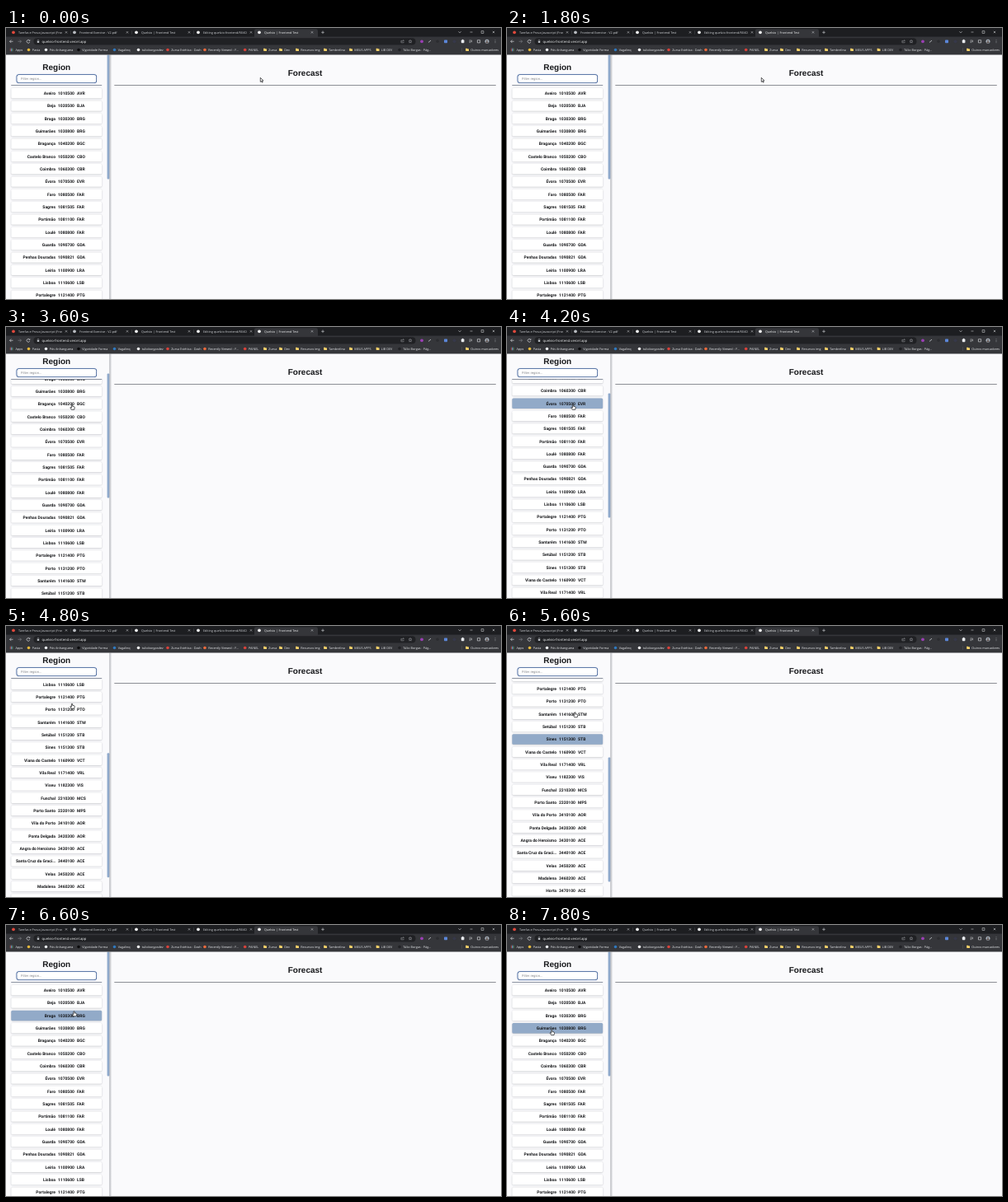
Write an HTML page with a canvas that moves like this. It is 600x329 px and loops after 8000 ms.

```html
<!DOCTYPE html>
<html lang="pt">
<head>
<meta charset="utf-8">
<title>Forecast</title>
<style>
html, body { margin: 0; width: 100%; height: 100%; overflow: hidden; background: #fafafc; }
canvas { display: block; width: 600px; height: 329px; }
</style>
</head>
<body>
<canvas id="stage"></canvas>
<script>
const W = 600, H = 329, LOOP = 8000;
const canvas = document.getElementById('stage');
const ctx = canvas.getContext('2d');
const dpr = window.devicePixelRatio || 1;
canvas.width = W * dpr;
canvas.height = H * dpr;

const UI = '"Open Sans", sans-serif';
const PAGE = 'Roboto, sans-serif';
const ARIAL = '"Liberation Sans", Arial, sans-serif';

const PITCH = 15.33, FIRST = 79.3, ROW_H = 12.4;
const VIEW_TOP = 32.5, THUMB_H = 151, MAX_SCROLL = 284;

const regions = `Aveiro 1010500 AVR|Beja 1020500 BJA|Braga 1030300 BRG|Guimarães 1030800 BRG
Bragança 1040200 BGC|Castelo Branco 1050200 CBO|Coimbra 1060300 CBR|Évora 1070500 EVR
Faro 1080500 FAR|Sagres 1081505 FAR|Portimão 1081100 FAR|Loulé 1080800 FAR
Guarda 1090700 GDA|Penhas Douradas 1090821 GDA|Leiria 1100900 LRA|Lisboa 1110600 LSB
Portalegre 1121400 PTG|Porto 1131200 PTO|Santarém 1141600 STM|Setúbal 1151200 STB
Sines 1151300 STB|Viana do Castelo 1160900 VCT|Vila Real 1171400 VRL|Viseu 1182300 VIS
Funchal 2310300 MCS|Porto Santo 2320100 MPS|Vila do Porto 3410100 AOR|Ponta Delgada 3420300 AOR
Angra do Heroísmo 3430100 ACE|Santa Cruz da Graci… 3440100 ACE|Velas 3450200 ACE|Madalena 3460200 ACE
Horta 3470100 ACE|Santa Cruz das Flor… 3480200 AOC|Vila do Corvo 3490100 AOC`
  .split(/[|\n]/).map(s => s.match(/^(.*) (\d+) (\w+)$/).slice(1));

// [time, scroll]
const scrollKeys = [[3350, 0], [3850, 93.9], [4320, 93.9], [4800, 238.3], [5120, MAX_SCROLL],
  [5500, MAX_SCROLL], [6000, 107.6], [6550, 0]];
// [time, x, y] of the pointer tip
const pointerKeys = [[2050, 308.3, 60.3], [2400, 150, 96], [2800, 82, 80], [3100, 75.5, 87.6], [3240, 75.5, 87.6],
  [3400, 80, 94], [5000, 80, 94], [5180, 82.5, 104.5], [6650, 82.5, 104.5], [7080, 72, 154],
  [7380, 67.5, 127.3], [7620, 67.5, 127.3], [7790, 54.3, 127.3]];
// [from, to, row] while the pointer rests on a row
const hovers = [[2750, 3210, 0], [3290, 3500, 1], [3820, 4370, 7], [5130, 5720, 20], [5800, 5850, 13],
  [6300, 6740, 2], [6740, 6870, 3], [6870, 7000, 4], [7000, 7180, 5], [7180, 7290, 4], [7290, 9000, 3]];
const FADE = 250;

function at(keys, t, col) {
  if (t <= keys[0][0]) return keys[0][col];
  for (let i = 1; i < keys.length; i++) {
    const a = keys[i - 1], b = keys[i];
    if (t < b[0]) return a[col] + (b[col] - a[col]) * (t - a[0]) / (b[0] - a[0]);
  }
  return keys[keys.length - 1][col];
}

function glow(row, t) {
  let sum = 0;
  for (const [from, to, r] of hovers) {
    if (r === row) sum += Math.max(0, Math.min(t, to) - Math.max(t - FADE, from));
  }
  return Math.min(1, sum / FADE);
}

function text(str, x, y, size, color, family = UI, weight = 400, align = 'left') {
  ctx.font = `${weight} ${size}px ${family}`;
  ctx.fillStyle = color;
  ctx.textAlign = align;
  ctx.textBaseline = 'alphabetic';
  ctx.fillText(str, x, y);
}

function rect(x, y, w, h, color) {
  ctx.fillStyle = color;
  ctx.fillRect(x, y, w, h);
}

function pill(x, y, w, h, r, color) {
  ctx.beginPath();
  ctx.roundRect(x, y, w, h, r);
  ctx.fillStyle = color;
  ctx.fill();
}

function dot(x, y, r, color) {
  ctx.beginPath();
  ctx.arc(x, y, r, 0, 7);
  ctx.fillStyle = color;
  ctx.fill();
}

function stroke(d, x, y, color, width = 0.6) {
  ctx.save();
  ctx.translate(x, y);
  ctx.strokeStyle = color;
  ctx.lineWidth = width;
  ctx.stroke(new Path2D(d));
  ctx.restore();
}

const CROSS = 'M-1.2-1.2L1.2 1.2M1.2-1.2L-1.2 1.2';

function drawTabs() {
  rect(0, 0, W, 11, '#1d1e21');
  pill(301, 1.2, 77, 12, 2.2, '#35363a');
  const tabs = [
    [9, '#e0493c', 'Tarefas e Prova Javascript (Fronte'],
    [83, '#b9bcc1', 'Frontend Exercise - V2.pdf'],
    [158, '#f2f2f2', 'Quelvio | Frontend Test'],
    [233, '#f2f2f2', 'Editing quelvio-frontend/READM'],
    [307, '#f2f2f2', 'Quelvio | Frontend Test']
  ];
  tabs.forEach(([x, color, label], i) => {
    dot(x, 5.3, 1.9, color);
    ctx.save();
    ctx.beginPath();
    ctx.rect(x + 5, 0, 54, 11);
    ctx.clip();
    text(label, x + 6, 6.6, 3.75, i === 4 ? '#f1f3f4' : '#d0d3d7');
    ctx.restore();
    stroke(CROSS, x + 64, 5.3, '#d0d3d7', 0.5);
    if (i < 3) rect(x + 69, 3.2, 0.4, 4.5, '#55575c');
  });
  stroke('M-1.8 0H1.8M0-1.8V1.8', 384, 5.3, '#d0d3d7');
  stroke('M-1.5-.7L0 .8L1.5-.7', 550, 5, '#e8eaed');
  stroke('M-1.5 0H1.5', 564, 5, '#e8eaed', 0.5);
  stroke('M-1.4-1.4H1.4V1.4H-1.4Z', 577.5, 5, '#e8eaed', 0.5);
  stroke(CROSS, 591, 5, '#e8eaed', 0.5);
}

function drawToolbar() {
  rect(0, 10.6, W, 21.9, '#35363a');
  stroke('M2 0H-2M-.2-1.8L-2 0L-.2 1.8', 6.5, 16.3, '#e8eaed');
  stroke('M-2 0H2M.2-1.8L2 0L.2 1.8', 16.5, 16.3, '#85888d');
  stroke('M1.6-1A1.9 1.9 0 1 0 1.8.7M1.9-2V-.7H.6', 27, 16.3, '#e8eaed');
  pill(33.5, 12.2, 463, 8.3, 4.1, '#202124');
  rect(37.8, 15.9, 2.4, 2, '#c4c7cc');
  stroke('M-.8 0V-1A.8.8 0 0 1 .8-1V0', 39, 16, '#c4c7cc', 0.4);
  text('quelvio-frontend.vercel.app', 43.5, 17.8, 4.2, '#f1f3f4');
  stroke('M-.6-.8H-1.6V1.6H1.6V.6M-.6.5Q-.4-1 1.7-1M.9-1.9L1.8-1L.9-.1', 480.5, 16.2, '#c4c7cc', 0.4);
  stroke('M0-1.9L.6-.6L1.9-.5L.9.4L1.2 1.8L0 1L-1.2 1.8L-.9.4L-1.9-.5L-.6-.6Z', 490, 16.3, '#c4c7cc', 0.4);
  dot(504, 16.3, 1.9, '#9b3fb5');
  stroke('M-1.5 1.2L1.5-1.2', 513.5, 16.3, '#b5b8bd', 0.9);
  dot(523, 16.3, 1.8, '#2b2c30');
  pill(531, 14.4, 4, 3.9, 0.7, '#5b86d8');
  dot(543.5, 16.3, 1.9, '#36384a');
  pill(551.8, 14.6, 3.6, 3.6, 0.7, '#e8eaed');
  dot(553.6, 14.5, 0.8, '#e8eaed');
  stroke('M-1.7-1.3H.4M-1.7 0H.4M-1.7 1.3H-.2M1.2-1.5V1', 563.3, 16.3, '#e8eaed', 0.5);
  stroke('M-1.6-1.6H1.6V1.6H-1.6Z', 573, 16.3, '#e8eaed', 0.6);
  dot(583, 16.3, 2.5, '#a9b4bf');
  dot(583, 15.7, 0.9, '#5a4b45');
  pill(581.5, 16.7, 3, 1.6, 0.8, '#5a4b45');
  for (const dy of [-1.5, 0, 1.5]) dot(593, 16.3 + dy, 0.4, '#e8eaed');
}

function drawBookmarks() {
  for (let i = 0; i < 9; i++) {
    rect(4.8 + i % 3 * 1.3, 24.7 + Math.floor(i / 3) * 1.3, 0.9, 0.9, ['#e06055', '#6aa6f5', '#7bc47f'][i % 3]);
  }
  const links = [
    [27.5, '#e5b83c', 'Pasta'], [48.5, '#e8eaed', 'Pós Anhanguera'], [88, '#0b0b0c', 'Vigoridade Forma'],
    [131.5, '#2f78bd', 'Vagalinq'], [160.5, '#f2f2f2', 'tulioborgasdev'], [196, '#d9423a', 'Zurva Estética - Dash'],
    [241, '#ee6a3c', 'Recently Viewed – F...'], [289.7, '#d9423a', 'PAINEL'], [477, '#202124', 'Túlio Borgas - Pág...']
  ];
  text('Apps', 11.5, 27.9, 3.75, '#e8eaed');
  for (const [x, color, label] of links) {
    dot(x, 26.5, 1.8, color);
    text(label, x + 4.2, 27.9, 3.75, '#e8eaed');
  }
  const folders = [[314, 'Zurva'], [333, 'Dev'], [353, 'Recursos img'], [387, 'Tambrelina'],
    [418, 'MEUS APPS'], [450.5, 'LIB DEV'], [559, 'Outros marcadores']];
  for (const [x, label] of folders) {
    pill(x - 1.8, 24.8, 1.8, 1.2, 0.3, '#f5d26a');
    pill(x - 1.8, 25.3, 3.8, 2.8, 0.4, '#f5d26a');
    text(label, x + 4.3, 27.9, 3.75, '#e8eaed');
  }
  rect(552.5, 24.2, 0.4, 4.6, '#5f6166');
}

function drawRow(i, scroll, t) {
  const y = FIRST + i * PITCH - scroll;
  if (y < 50 || y > 340) return;
  const g = glow(i, t);
  const mix = (a, b) => Math.round(a + (b - a) * g);
  ctx.save();
  ctx.shadowColor = 'rgba(40,45,60,.3)';
  ctx.shadowBlur = 1.8 * dpr;
  ctx.shadowOffsetY = 0.4 * dpr;
  pill(6.3, y - ROW_H / 2, 109.8, ROW_H, 1.5, `rgb(${mix(255, 146)},${mix(255, 170)},${mix(255, 200)})`);
  ctx.restore();
  const [name, id, code] = regions[i];
  text(name, 60, y + 1.8, 5, '#17181b', PAGE, 700, 'right');
  text(id, 62.9, y + 1.8, 5, '#17181b', PAGE, 700);
  text(code, 86, y + 1.8, 5, '#17181b', PAGE, 700);
}

function drawPage(scroll, t) {
  rect(0, 32, W, H - 32, '#fafafc');
  const lift = Math.min(scroll, 6);
  const line = 69.6 - lift;

  ctx.save();
  ctx.beginPath();
  ctx.rect(0, line, 122, H - line);
  ctx.clip();
  regions.forEach((_, i) => drawRow(i, scroll, t));
  ctx.restore();

  text('Region', 61.2, 50.7 - lift, 10, '#17181b', ARIAL, 700, 'center');
  ctx.save();
  ctx.shadowColor = 'rgba(70,110,190,.45)';
  ctx.shadowBlur = 1.5 * dpr;
  pill(12.6, 56.2 - lift, 97.4, 10.8, 3, '#3f5f94');
  ctx.restore();
  pill(13.4, 57 - lift, 95.8, 9.2, 2.3, '#ffffff');
  text('Filter region...', 18, 63.2 - lift, 4.17, '#85878c', ARIAL);
  rect(6.2, line - 0.4, 110, 0.8, '#70798a');

  pill(122.6, VIEW_TOP + scroll * 0.511, 2.7, THUMB_H, 1, '#8fa9cb');
  const shade = ctx.createLinearGradient(125.3, 0, 128.3, 0);
  shade.addColorStop(0, 'rgba(70,75,85,.4)');
  shade.addColorStop(1, 'rgba(70,75,85,0)');
  rect(125.3, 32.5, 3, H - 32.5, shade);

  text('Forecast', 362.6, 57.6, 10, '#17181b', ARIAL, 700, 'center');
  rect(131.3, 69.1, 462.5, 0.8, '#70737b');
}

const ARROW = new Path2D('M0 0V5.1L1.2 4L2 5.9L2.9 5.5L2.1 3.7H3.7Z');
const HAND = new Path2D('M-.6.5Q0-.4.6.5V2.3L2.8 2.8Q3.4 3 3.2 4L2.7 6.3H-.7L-2.2 4Q-2.2 3-1.4 3.5L-.6 4.1Z');

function drawPointer(t) {
  const x = at(pointerKeys, t, 1), y = at(pointerKeys, t, 2);
  const hand = t > 3250 || (t > 2750 && t < 3020);
  ctx.save();
  ctx.translate(x, y);
  ctx.lineJoin = 'round';
  ctx.lineWidth = 0.7;
  ctx.strokeStyle = '#16171a';
  ctx.fillStyle = '#ffffff';
  const shape = hand ? HAND : ARROW;
  ctx.fill(shape);
  ctx.stroke(shape);
  ctx.restore();
}

function draw(t) {
  ctx.setTransform(dpr, 0, 0, dpr, 0, 0);
  ctx.textRendering = 'geometricPrecision';
  drawPage(at(scrollKeys, t, 1), t);
  drawTabs();
  drawToolbar();
  drawBookmarks();
  drawPointer(t);
}

const start = performance.now();
function tick() {
  draw((performance.now() - start) % LOOP);
  requestAnimationFrame(tick);
}
tick();
</script>
</body>
</html>
```
